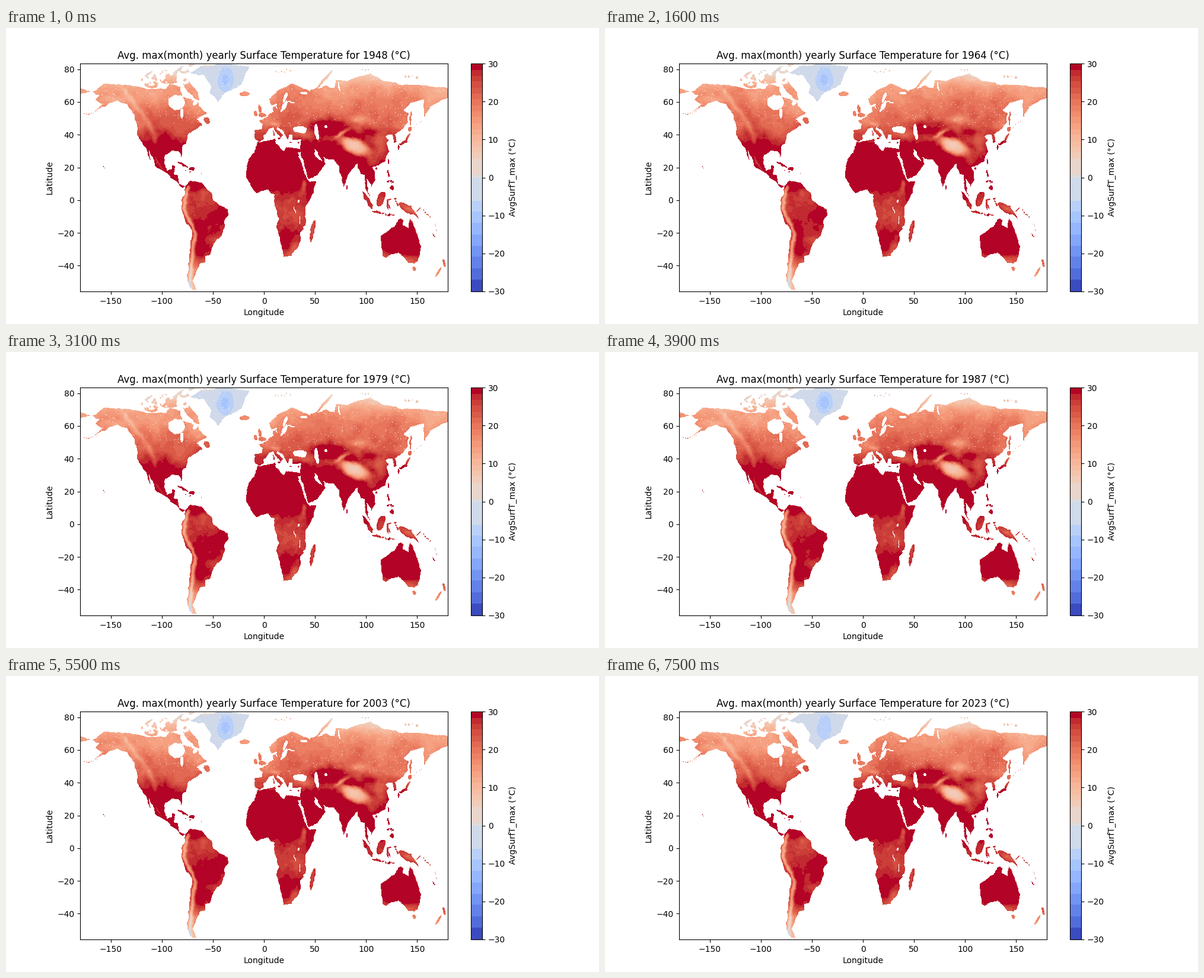
Recreate the animation shown at these times as a matplotlib script. Size 1000x500 px, loop 7.6 s.

```python
import numpy as np
import matplotlib.pyplot as plt
from matplotlib.animation import FuncAnimation
from matplotlib.colors import ListedColormap
from matplotlib.path import Path

W, H = 620, 385
WEST, EAST, SOUTH, NORTH = -180, 180, -55.75, 83.5
FIRST, LAST = 1948, 2023


def weights(n, k):
    d = np.abs(np.linspace(0, k - 1, n)[:, None] - np.arange(k))
    u = np.clip(1 - d, 0, 1)
    return u * u * (3 - 2 * u)


def smooth(rng, cells):
    """Smooth random field, with the given number of cells across."""
    ny = max(4, int(cells * H / W))
    return weights(H, ny) @ rng.standard_normal((ny, cells)) @ weights(W, cells).T


def fractal(rng, cells, octaves):
    return sum(smooth(rng, cells * 2 ** k) * 0.6 ** k for k in range(octaves))


rng = np.random.default_rng(7)
LON, LAT = np.meshgrid(WEST + (np.arange(W) + 0.5) * (EAST - WEST) / W,
                       NORTH - (np.arange(H) + 0.5) * (NORTH - SOUTH) / H)
# Warped coordinates give straight outlines a rough coast
X = LON + 0.38 * fractal(rng, 70, 3)
Y = LAT + 0.28 * fractal(rng, 70, 3)
mask = np.zeros((H, W), bool)


def inside(*xy):
    pts = np.c_[X.ravel(), Y.ravel()]
    return Path(np.reshape(xy, (-1, 2))).contains_points(pts).reshape(H, W)


def dist2(lon, lat, rx, ry, tilt=0):
    c, s = np.cos(np.radians(tilt)), np.sin(np.radians(tilt))
    dx, dy = X - lon, Y - lat
    return ((dx * c + dy * s) / rx) ** 2 + ((dy * c - dx * s) / ry) ** 2


def land(*xy):
    mask[inside(*xy)] = True


def isle(*oval):
    mask[dist2(*oval) < 1] = True


def sea(*oval):
    mask[dist2(*oval) < 1] = False


def chain(n, lon0, lat0, lon1, lat1, size=0.7):
    for t in np.linspace(0, 1, n):
        dx, dy = rng.normal(0, 0.4, 2)
        r = size * rng.uniform(0.6, 1.3)
        isle(lon0 + t * (lon1 - lon0) + dx, lat0 + t * (lat1 - lat0) + dy, r, r * 0.6)


# Arctic Canada, broken up by straits
isle(-72, 68, 11, 3, -38)
isle(-110, 71, 7, 2.3)
isle(-121.5, 73, 3, 1.5)
isle(-78, 79.7, 11, 2.6, 15)
isle(-100, 76, 17, 3)
isle(-93, 73, 9, 1.6)
mask &= (fractal(rng, 90, 2) > -0.2) | (Y < 70)

# North America
land(-168, 66, -157, 71, -128, 70, -115, 68, -96, 68, -92, 71.5, -82, 69, -80, 63,
     -73, 62, -65, 59.5, -56, 52.5, -66, 50, -61, 45.8, -66, 43.5, -70.5, 42,
     -74, 40.5, -76, 35, -81, 31.5, -80.3, 25.3, -83, 29.5, -89.5, 29.8,
     -97.3, 27.5, -97, 20.5, -95, 18.2, -91, 18.8, -90, 21.2, -87, 21.2,
     -88.5, 15.8, -83.4, 15, -83, 9.5, -77.5, 8.5, -80, 7.4, -86, 11, -94, 16,
     -105.5, 20, -109, 26, -114, 31.5, -109.8, 23, -117, 32.5, -124, 40,
     -124.5, 48.5, -134, 58.5, -146, 60.5, -153, 59, -164, 54.7, -157.5, 58.7,
     -165, 61.5, -161, 64.5)
sea(-86, 59.7, 8.5, 4.7)
sea(-80.5, 53, 1.6, 3)
sea(-67.5, 59.5, 2, 1.4)
isle(-56, 48.7, 2.8, 1.7)
isle(-126, 49.7, 2.2, 0.7, -40)
isle(-79.5, 21.8, 5.2, 0.6, -18)
isle(-71.2, 18.9, 2.8, 0.8)
isle(-84, 64.6, 3, 1.1)

# Greenland
ice = inside(-72, 78, -58, 75.7, -51, 69.5, -53, 65.5, -44, 60, -39, 65.5,
             -22, 70.5, -18, 77, -14, 81.5, -33, 83.4, -62, 82)
mask |= ice

# South America
land(-77.5, 8.5, -72, 12, -62, 10.6, -51, 4, -50, 0, -44, -2.5, -35.2, -5.5,
     -35, -9, -39, -13, -39.5, -18, -41, -22, -48.5, -25.5, -53.5, -34,
     -58, -34.3, -57.5, -38, -62.5, -39, -65, -42, -67.5, -46, -69, -51,
     -65.5, -55, -73, -53, -75.3, -48, -73.5, -37, -70.3, -19, -76, -14,
     -81.2, -5, -80, 1, -77.5, 4)

# Europe and the Middle East
land(60, 25.3, 57, 26.5, 59.8, 22.5, 52, 15.6, 43.3, 12.8, 39.5, 20.5, 35, 29.5,
     35.5, 36.7, 27, 36.8, 27, 40.5, 24, 40.5, 22.5, 36.6, 19.5, 41.5, 14, 45.5,
     12.5, 44.5, 18.3, 40, 15.8, 38, 8.8, 44.4, 4, 43.4, 0, 39.5, -1, 37.3,
     -5.6, 36, -9, 37, -9.3, 43, -1.6, 43.4, -1.3, 46, -4.7, 48.3, 1.5, 50.5,
     4.5, 52.3, 8.6, 54, 8.3, 57, 5.5, 59, 5, 62, 14, 67.5, 26, 71, 41, 67.5,
     44, 66.5, 46, 68, 60, 69)
sea(34.5, 43.2, 6.8, 1.9)
sea(19, 57, 4.6, 1.5, 50)
sea(20, 62.7, 3.6, 1.3, 60)
sea(26, 59.8, 3.5, 0.5)
sea(9.5, 58, 3, 0.6, 15)
sea(11.6, 56.6, 1.4, 0.6, -60)
sea(38, 65.3, 3.5, 0.9)
sea(52, 27, 4.8, 1.1, -38)
isle(-1.7, 52.1, 3.3, 1.4)
isle(-3.7, 56, 2.8, 1.4, 120)
isle(-8, 53.3, 1.9, 1.6)
isle(-19, 65, 5, 1.4)
isle(14, 37.5, 1.4, 0.6)
isle(9, 41, 0.6, 2)
isle(25, 35.2, 1.2, 0.3)
isle(33.2, 35.1, 0.9, 0.4)

# Asia
land(59.9, 25.3, 67, 24.8, 72.7, 20.5, 77.5, 8.2, 80.2, 13.5, 82.5, 16.8, 91, 22.5,
     94.5, 16, 98, 15.5, 98.3, 8, 103.5, 1.4, 101, 6.5, 100.3, 13, 105, 8.7,
     109.2, 12.5, 106, 20, 110, 20.8, 117, 23.6, 121.8, 30, 119.5, 35, 122, 37,
     118, 39, 121.5, 40.3, 125.5, 39.5, 126.5, 34.5, 129.4, 36, 128, 39.8,
     135.5, 44, 140.5, 48.5, 140.5, 53, 136, 54.8, 143, 59.3, 156, 61.5, 155.8, 56,
     157, 51, 162.5, 57, 170, 60, 181, 63, 181, 68.8, 160, 69.8, 129, 71.3,
     113, 74, 104, 77.5, 81, 73, 70, 73, 68, 68.7, 59.9, 69)
land(-181, 65, -181, 69, -170, 66)
sea(51, 41.8, 5.2, 2.1, -75)
sea(59.7, 45.1, 1.6, 1)
sea(73, 69.5, 0.8, 2.8)
isle(59, 73.8, 9.5, 1.1, 35)
isle(143, 50, 0.8, 4.2)
isle(142.8, 43.4, 2, 1.2)
isle(135.5, 35, 4, 0.8, 12)
isle(140, 38, 3.4, 0.9, 65)
isle(131, 32.5, 0.9, 1.3)
isle(121, 23.7, 0.6, 1.5)
isle(109.7, 19.2, 0.9, 0.7)
isle(80.8, 7.8, 0.8, 1.6)

# Africa
land(-6, 35.8, 10.5, 37.2, 10.5, 34, 19, 30.4, 21, 32.7, 34.5, 31.3, 34.8, 29,
     32.8, 29, 37.3, 20, 43, 11.8, 51, 11.8, 47, 4, 39.3, -5, 40.6, -15, 35, -20,
     35.3, -24, 31.5, -29.5, 26, -34, 19, -34.6, 14.5, -22.5, 11.8, -17,
     13.5, -10, 9, -1, 9.5, 4, 6, 4.3, 3, 6.4, -7.5, 4.4, -13.2, 9, -17, 14.7,
     -17, 21, -10, 29.5)
isle(46.8, -18.8, 7, 1.9, 75)
sea(32.8, -0.6, 0.9, 0.7)
sea(30, -6, 2.6, 0.35, -65)
sea(34.6, -12, 0.35, 2.4)

# Southeast Asia and Oceania
isle(114, 0.8, 5.5, 3.2, 50)
isle(100.8, 0, 7.3, 1.4, -45)
isle(110, -7.3, 4.7, 0.6, -10)
isle(120.5, -2.2, 0.9, 3.2)
isle(122.5, 0.7, 2.2, 0.4)
isle(122, -3.3, 2, 0.6, -60)
isle(139.5, -5, 9, 2.2, -20)
isle(147.5, -8.5, 4, 0.8, -40)
isle(150.3, -5.5, 2.2, 0.4, 25)
isle(121.2, 16.2, 2.6, 0.9, 105)
isle(124.8, 7.7, 1.9, 1.3)
land(113.5, -22, 115.7, -32, 115.2, -34.3, 118, -35, 124, -33, 131, -31.5,
     138, -35.5, 140.5, -38, 147, -38.7, 150, -37.5, 153.5, -28.5, 149, -20.5,
     145.5, -15, 142.4, -10.8, 140.8, -17.5, 135.5, -15, 136.8, -12.2,
     131, -12, 128.5, -15, 122, -18)
isle(146.5, -42.2, 1.7, 1.3)
isle(176, -38.7, 2.8, 1.2, -60)
isle(170.3, -43.8, 4.2, 1, 42)
isle(165.5, -21.3, 1.8, 0.3, -35)

# Small islands
chain(7, 115.5, -8.5, 126, -8.8, 0.9)
chain(5, 127.8, 1.5, 130, -3.2)
chain(7, 121.5, 11.5, 125.2, 11.5, 0.8)
chain(6, 155, -6, 161.5, -10.3)
chain(4, 167, -15, 169, -19, 0.5)
chain(7, -175, 52, -163, 54.6, 0.5)
chain(5, 147, 44.5, 155.5, 50, 0.5)
chain(6, 11, 78.5, 25, 79.5)
chain(4, 95, 80, 104, 78.8)
chain(4, 138, 75.5, 149, 75.2, 1)
chain(4, -77.5, 18.2, -61.5, 15.5, 0.5)
chain(3, -158, 21.4, -155.5, 19.6, 0.4)
mask &= (rng.random((H, W)) > 0.007) | (LAT < 45)

# Mean temperature: latitude profile, regional bumps, mountain ridges
temp = np.interp(Y, [-56, -45, -35, -30, -20, 0, 5, 8, 15, 30, 38, 45, 60, 68, 76, 84],
                 [7, 16, 24.5, 27.3, 28, 26.6, 29, 32, 33.5, 33, 27.5, 23.5, 18, 14.5, 6, 1])


def bump(amp, *oval, power=1):
    temp[:] += amp * np.exp(-dist2(*oval) ** power)


def ridge(amp, width, lat, lon):
    d = (X - np.interp(Y, lat, lon)) / width
    ends = np.clip(np.minimum(Y - lat[0], lat[-1] - Y) / 2, 0, 1)
    temp[:] += amp * ends * np.exp(-d * d)


# Americas
bump(5, -101, 32, 9, 6)
bump(-4, -82, 40, 12, 8)
bump(-4, -66, 55, 13, 7)
bump(-3, -97, 62, 14, 6)
bump(-5, -148, 61, 16, 2.5)
bump(-4, -84, 13, 6, 5)
bump(-4, -59, 5, 7, 3)
bump(4, -41, -8, 8, 7)
bump(5, -63, -27, 4, 10)
bump(-2, -48, -25, 7, 4)
ridge(-14, 1.9, [-56, -40, -20, -15, -5, 5, 10], [-72, -71.5, -67.5, -71, -78.5, -76, -73])
ridge(-5, 3, [33, 40, 48, 58, 69], [-106, -107, -114, -126, -138])
ridge(-6, 2, [16, 20, 25, 31], [-97, -101, -105.5, -108.5])
# Eurasia
bump(-24, 88, 33, 14, 4.6, -13, power=2)
bump(-14, 75, 40.5, 7, 1.3, 20)
bump(9, 83, 39.7, 7, 1.8)
bump(-8, 93, 49, 11, 3)
bump(4, 104, 41.5, 9, 2.5)
bump(7, 63, 45, 20, 5, power=2)
bump(-7, 112, 31, 11, 9)
bump(-4, 102, 24, 5, 4)
bump(2, 125, 62, 16, 5)
bump(-4, 167, 65, 19, 6)
bump(-5, 160, 56, 7, 6)
bump(-4, 138, 42, 11, 8)
bump(-4, 7, 62, 6, 5)
bump(-7, 11, 46.7, 5, 1.2)
bump(-4, 0, 50, 13, 6)
bump(-5, 40, 40.5, 9, 2.5)
# Africa and Oceania
bump(-8, 39, 9, 3, 5)
bump(5, 46, 5, 5, 7)
bump(-3, 27, -11, 14, 8)
bump(4, 22, -23, 6, 6)
bump(-5, 29, -29, 4, 3)
bump(-3, 47, -19, 2, 6)
bump(8, 133, -24, 24, 10, power=2)
bump(-5, 141, -5, 8, 1.4, -15)
temp += 0.8 * fractal(rng, 50, 4)

core = np.exp(-dist2(-38, 74, 9.5, 9.5))
rim = np.clip((Y - 80.5) / 2, 0, 1)
temp[ice] = (-2.4 - 7.6 * core + 3 * rim)[ice]
swing = np.where(ice, 0.6, np.interp(LAT, [-30, 0, 30, 50], [0.7, 0.45, 0.6, 1.1]))
warming = np.exp(-dist2(-47, -12, 12, 9))


def field(year):
    wave = fractal(np.random.default_rng(year), 13, 2)
    age = (year - FIRST) / (LAST - FIRST)
    t = temp + swing * wave + age * (0.5 + 1.8 * warming)
    return np.where(mask, t, np.nan)


# Banded colour scale
edges = np.r_[np.linspace(-30, -6, 9), 0, 0.8, np.linspace(5, 30, 17)]
mids = (edges[:-1] + edges[1:]) / 2
mids[0], mids[-1] = -30, 30
steps = np.linspace(-30, 30, 256)
band = np.clip(np.searchsorted(edges, steps, side="right") - 1, 0, len(mids) - 1)
cmap = ListedColormap(plt.get_cmap("coolwarm")((mids[band] + 30) / 60))
cmap.set_bad("white")

fig, ax = plt.subplots(figsize=(10, 5), dpi=100)
im = ax.imshow(field(FIRST), cmap=cmap, vmin=-30, vmax=30, aspect="auto",
               interpolation="nearest", extent=(WEST, EAST, SOUTH, NORTH))
fig.colorbar(im, ax=ax, label="AvgSurfT_max (°C)")
ax.set_xlabel("Longitude")
ax.set_ylabel("Latitude")
title = ax.set_title("")


def update(i):
    year = FIRST + i
    im.set_data(field(year))
    title.set_text(f"Avg. max(month) yearly Surface Temperature for {year} (°C)")
    return im, title


anim = FuncAnimation(fig, update, frames=LAST - FIRST + 1, interval=100,
                     init_func=lambda: update(0), repeat=True, repeat_delay=0)
plt.show()
```
